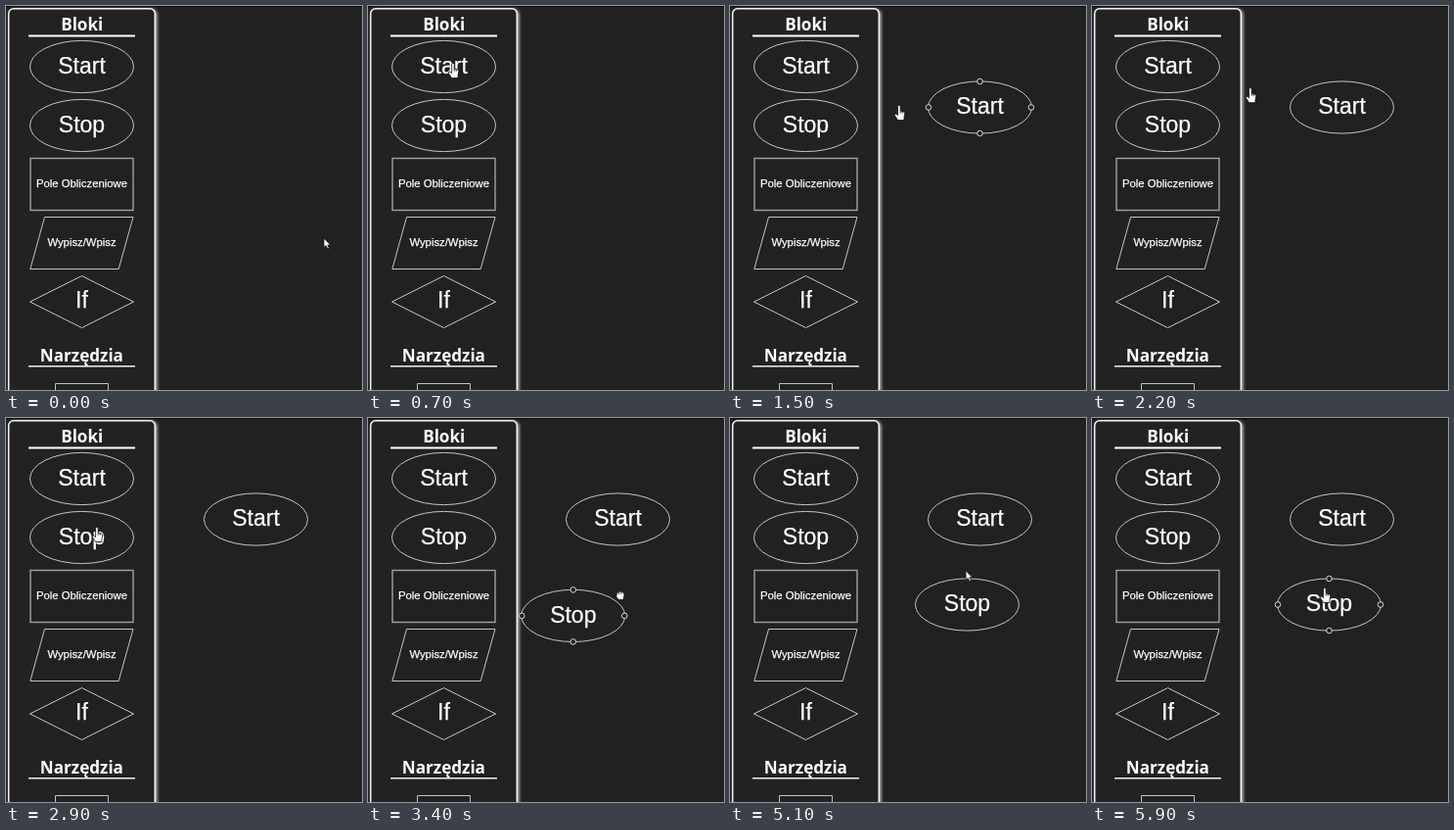
An HTML page that plays this animation: 364x392 px, repeating every 6300 ms.

```html
<!DOCTYPE html>
<html lang="pl">
<head>
<meta charset="utf-8">
<title>Bloki</title>
<style>
  html, body { margin: 0; width: 100%; height: 100%; overflow: hidden; background: #212121; }
  svg { display: block; width: 364px; height: 392px; }
  text { fill: #fff; stroke: #fff; stroke-width: .25; text-anchor: middle; font-family: "Liberation Sans", Arial, sans-serif; }
  .head { font: 700 17.1px "Open Sans", "Noto Sans", sans-serif; stroke: none; }
  .big { font-size: 23px; }
  .small { font-size: 11.3px; }
  .shape { fill: #212121; stroke: #c4c4c4; stroke-width: 1; }
  .knob { fill: #212121; stroke: #d8d8d8; stroke-width: 1; }
  .cursor { fill: #fff; stroke: #111; stroke-width: .8; stroke-linejoin: round; }
</style>
</head>
<body>
<svg viewBox="0 0 364 392">
  <defs>
    <filter id="glow" x="-10%" y="-5%" width="120%" height="110%">
      <feDropShadow dx="1.6" dy="1" stdDeviation="1.4" flood-color="#fff" flood-opacity=".7"/>
    </filter>
    <g id="startBlock"><ellipse class="shape" rx="53" ry="26.6"/><text class="big" y="6.7">Start</text></g>
    <g id="stopBlock"><ellipse class="shape" rx="53" ry="26.6"/><text class="big" y="6.7">Stop</text></g>
    <g id="knobs" class="knob">
      <circle cy="-26.5" r="2.8"/><circle cy="26.5" r="2.8"/>
      <circle cx="-52.5" r="2.8"/><circle cx="52.5" r="2.8"/>
    </g>
  </defs>

  <rect width="364" height="392" fill="#212121"/>
  <rect width="364" height="1" fill="#080808"/>
  <rect x="2.7" y="2.7" width="149.6" height="420" rx="5" fill="#212121" stroke="#f4f4f4" stroke-width="1.5" filter="url(#glow)"/>

  <text class="head" x="77.7" y="25.4">Bloki</text>
  <rect x="23" y="29.5" width="109" height="2" fill="#fff"/>
  <text class="head" x="77.4" y="362.7">Narzędzia</text>
  <rect x="23" y="367" width="109" height="1.5" fill="#eee"/>

  <use href="#startBlock" x="77.5" y="62"/>
  <use href="#stopBlock" x="77.5" y="122"/>
  <rect class="shape" x="25" y="155.5" width="105" height="53" style="stroke:#a2a2a2;stroke-width:1.4"/>
  <text class="small" x="77.5" y="185">Pole Obliczeniowe</text>
  <path class="shape" d="M39.5 215.5H130L115.2 268.5H24.8Z"/>
  <text class="small" x="77.5" y="245">Wypisz/Wpisz</text>
  <path class="shape" d="M77.5 275.5L130.5 302L77.5 328.5L24.5 302Z"/>
  <text class="big" x="77.5" y="308.4">If</text>
  <path class="shape" d="M50.5 395V385.5H104.5V395"/>

  <g id="start"><use href="#startBlock"/><use href="#knobs"/></g>
  <g id="stop"><use href="#stopBlock"/><use href="#knobs"/></g>

  <g id="cursor" class="cursor">
    <path d="M0 0V9.6L2.2 7.6L3.8 11L5.4 10.2L3.9 7H6.8Z"/>
    <path d="M-1.4 1Q0-.6 1.2 1V6L5 7.2Q6 7.6 5.8 9L5 12.6V15.5H-1.4L-4.6 10.6Q-5 8.6-3 9.2L-1.4 10.6ZM1.2 6V8.6M3.2 6.7V8.8"/>
    <path d="M-3.8 4.2Q-3.4 1.6-1.6 1.8Q-.4.4.8 1.6Q2.4 1 2.8 2.4Q4.4 2.6 4 5L3 9.4H-2L-4.2 6.2ZM-1.4 2V4M.9 1.8V4"/>
  </g>
</svg>
<script>
const LOOP = 6300, STEP = 100;
const ARROW = 0, HAND = 1, FIST = 2;
const $ = id => document.getElementById(id);

const palette = [62, 122, 182, 242, 302].map(y => [77.5, y]);

// Blocks glide from the palette to their place, lagging behind the pointer.
const blocks = [
  { el: $("start"), from: palette[0], to: [255.5, 103.5], begin: 9, end: 13.3, sag: 15 },
  { el: $("stop"), from: palette[1], to: [242.5, 190.5], begin: 30, end: 35.6, sag: 25 }
];

// Pointer trips, times in steps; the pointer rests between them.
const home = [325, 237];
const trips = [
  { begin: 0, end: 7, to: [87, 58], sag: 90 },
  { begin: 8, end: 12, to: [264, 102], sag: 12 },
  { begin: 14, end: 15, to: [173, 101] },
  { begin: 15, end: 18, to: [82, 64] },
  { begin: 20, end: 23, to: [190, 90] },
  { begin: 24, end: 29, to: [93, 111] },
  { begin: 30, end: 34, to: [258, 176], sag: 16 },
  { begin: 38, end: 42, to: [178, 140] },
  { begin: 42, end: 44, to: [60, 56] },
  { begin: 44, end: 46, to: [231, 110] },
  { begin: 46, end: 47, to: [247, 111] },
  { begin: 48, end: 52, to: [240, 164] },
  { begin: 53, end: 59, to: [238, 173] }
];

const clamp = v => Math.min(1, Math.max(0, v));

// Eased trip that bulges downwards by sag; skew > 1 delays the bulge.
function glide(from, { begin, end, to, sag = 0 }, t, skew = 1) {
  const k = clamp((t - begin) / (end - begin));
  const s = k * k * (3 - 2 * k);
  return [
    from[0] + (to[0] - from[0]) * s,
    from[1] + (to[1] - from[1]) * s + sag * Math.sin(Math.PI * k ** skew)
  ];
}

const pointerAt = t => trips.reduce((p, trip) => t > trip.begin ? glide(p, trip, t) : p, home);
const blockAt = (block, t) => glide(block.from, block, t, 2);
const dragged = (block, t) => t >= block.begin && t <= block.end;

function inside([x, y], [cx, cy]) {
  return Math.hypot((x - cx) / 53, (y - cy) / 26.5) < 1;
}

// Hover state lingers for one step.
const hovers = (centre, t) => inside(pointerAt(t), centre) || inside(pointerAt(t - 1), centre);

function move(el, [x, y]) {
  el.setAttribute("transform", `translate(${x} ${y})`);
}

function show(el, on) {
  el.style.display = on ? "" : "none";
}

function render(ms) {
  const t = Math.floor((ms % LOOP) / STEP);
  let kind = palette.some(centre => hovers(centre, t)) ? HAND : ARROW;

  for (const block of blocks) {
    const placed = t >= block.begin;
    const centre = blockAt(block, t);
    const hover = placed && hovers(centre, t);
    const drag = dragged(block, t);
    show(block.el, placed);
    move(block.el, centre);
    show(block.el.lastElementChild, hover || drag);
    if (drag) kind = FIST;
    else if (hover) kind = HAND;
  }

  move($("cursor"), pointerAt(t));
  [...$("cursor").children].forEach((icon, i) => show(icon, i === kind));
}

const begin = performance.now();
function tick() {
  render(performance.now() - begin);
  requestAnimationFrame(tick);
}
tick();
</script>
</body>
</html>
```
